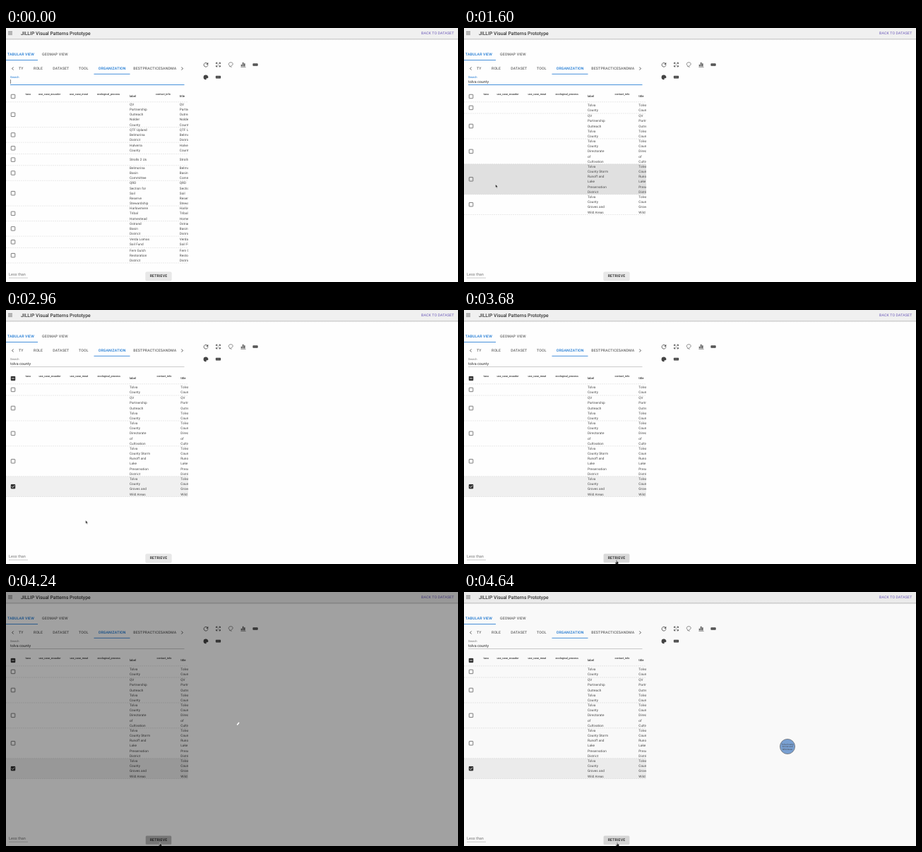
Recreate the animation shown at these times as an HTML page. Size 640x360 px, loop 4.72 s.

```html
<!DOCTYPE html>
<html lang="en">
<head>
<meta charset="utf-8">
<title>Table search</title>
<style>
  html, body { margin: 0; width: 100%; height: 100%; overflow: hidden; background: #fefefe; }
  svg { display: block; width: 100vw; height: 100vh; }
  text { font-family: Roboto, Arial, sans-serif; text-rendering: geometricPrecision; white-space: pre; }
  .tab { font-size: 5.2px; font-weight: 500; letter-spacing: .15px; fill: #666; }
  .on { fill: #1976d2; }
  .cell { font-size: 4.7px; letter-spacing: .05px; fill: #444; }
  .head { font-size: 3.75px; font-weight: 500; fill: #333; }
</style>
</head>
<body>
<svg id="stage" viewBox="0 0 640 360" xmlns="http://www.w3.org/2000/svg"></svg>
<script>
const LOOP = 4720, STEP = 80;
const TOP = 104.8, LINE = 7.17, MIN_ROW = 16.3;
const QUERY = 'tolva county';

const allRows = [
  'QV|Partnership|Outreach|Nolder|County',
  'QTF Upland|Belmorina|District',
  'Halverra|County',
  'Strolls 2 Us',
  'Belmorina|Basin|Committee',
  'QRD|Section for|Soil|Reserve|Stewardship',
  'Harlowmere|Tribal|Homestead',
  'Ostrand|Basin|District',
  'Verda Lomas|Soil Fund',
  'Fern Gulch|Restoration|District'
];
const foundRows = [
  'Tolva|County',
  'QV|Partnership|Outreach|Tolva|County',
  'Tolva|County|Directorate|of|Cultivation',
  'Tolva|County Storm|Runoff and|Lake|Preservation|District',
  'Tolva|County|Groves and|Wild Areas'
];

const text = (x, y, s, cls, extra = '') => `<text x="${x}" y="${y}" class="${cls}" ${extra}>${s}</text>`;
const rect = (x, y, w, h, fill, extra = '') =>
  `<rect x="${x}" y="${y}" width="${w}" height="${h}" fill="${fill}" ${extra}/>`;
const path = (d, extra = '') => `<path d="${d}" ${extra}/>`;
const icon = (cx, cy, body) =>
  `<g transform="translate(${cx} ${cy}) scale(.36) translate(-12 -12)" fill="#444">${body}</g>`;
const stroke = (d, w = 2) => path(d, `fill="none" stroke="#444" stroke-width="${w}"`);
const box = (cx, cy) => rect(cx - 2.75, cy - 2.75, 5.5, 5.5, 'none', 'rx=".5" stroke="#555" stroke-width=".75"');
const filledBox = (cx, cy, mark) =>
  rect(cx - 3.1, cy - 3.1, 6.2, 6.2, '#333', 'rx=".7"') +
  path(mark, `transform="translate(${cx} ${cy})" fill="none" stroke="#fff" stroke-width=".8"`);

function layout(rows) {
  let y = TOP;
  return rows.map(s => {
    const lines = s.split('|');
    const h = Math.max(MIN_ROW, lines.length * LINE);
    const row = { lines, y, h, mid: y + h / 2 };
    y += h;
    return row;
  });
}

function table(rows, id, dx) {
  const heads = [[27.5, 'taxa'], [46 + dx * .3, 'use_case_ecuador'], [90 + dx * .3, 'use_case_meat'],
    [129 + dx * .4, 'ecological_process'], [212 + dx, 'contact_info']];
  let out = heads.map(([x, s]) => text(x, 95, s, 'head')).join('');
  const titleX = 245.8 + dx;
  out += text(175, 98.3, 'label', 'head', 'style="font-size:4.2px"');
  out += text(titleX, 98.3, 'title', 'head', 'style="font-size:4.2px"');
  for (const r of rows) {
    const first = r.mid - (r.lines.length - 1) * LINE / 2 + 1.6;
    r.lines.forEach((s, i) => {
      const y = (first + i * LINE).toFixed(2);
      out += text(175, y, s, 'cell') + text(titleX, y, s, 'cell');
    });
    out += box(10, r.mid) +
      path(`M0 ${r.y + r.h}H258`, 'stroke="#d2d2d2" stroke-width=".5" stroke-dasharray="2 1"');
  }
  return `<g id="${id}" clip-path="url(#pane)">${out}</g>`;
}

const all = layout(allRows), found = layout(foundRows);
const picked = found[4];

const pill = icon(0, 0, rect(2, 7, 20, 10, '#444', 'rx="2"') +
  path('M5 12H19', 'stroke="#bbb" stroke-width="1.6" stroke-dasharray="3 2"'));
const place = (x, y, s) => `<g transform="translate(${x} ${y})">${s}</g>`;

const icons =
  icon(283, 52, stroke('M18.5 8A8 8 0 1 0 20 13', 2.2) + path('M21 3V11H13Z')) +
  icon(300.5, 52, stroke('M4 9V4H9M15 4H20V9M20 15V20H15M9 20H4V15M4 4L10 10M20 4L14 10M20 20L14 14M4 20L10 14', 2.4)) +
  icon(318.3, 52, stroke('M8 16C1 13 2 3 12 3S23 14 13 16M8 16A2 2 0 1 0 11 18C11 21 14 21 16 21', 1.7)) +
  icon(336, 52, path('M2 20H22V22H2ZM3 11H7V19H3ZM9 3H13V19H9ZM15 7H19V19H15Z')) +
  place(353, 52, pill) +
  icon(283, 69.8, path('M12 2.5A9.5 9.5 0 0 0 12 21.5C14 21.5 14 19.5 13.5 18.5C13 17 14 16 15.5 16H18C20 16 21.5 14 21.5 12C21.5 6.5 17 2.5 12 2.5Z')) +
  place(300.5, 69.6, pill);

document.getElementById('stage').innerHTML = `
  <defs>
    <clipPath id="pane"><rect y="84" width="258" height="256"/></clipPath>
    <linearGradient id="shade" x2="0" y2="1">
      <stop stop-color="#bdbdbd"/><stop offset="1" stop-color="#fefefe"/>
    </linearGradient>
  </defs>
  ${rect(0, 0, 640, 360, '#fefefe')}
  ${rect(0, 14.6, 640, 3, 'url(#shade)')}
  ${rect(0, 0, 640, 14.8, '#f0f0f0')}
  ${path('M3 5.2H9M3 7.2H9M3 9.2H9', 'stroke="#555" stroke-width=".75"')}
  ${text(21, 9.6, 'JILLIP Visual Patterns Prototype', '', 'font-size="6.8" font-weight="500" fill="#333"')}
  ${text(634.5, 9, 'BACK TO DATASET', 'tab', 'text-anchor="end" style="fill:#6a58b8;font-weight:400"')}
  ${text(2, 39, 'TABULAR VIEW', 'tab on')}
  ${text(51, 39, 'GEOMAP VIEW', 'tab')}
  ${rect(0, 45, 45, .8, '#1976d2')}
  ${path('M10.6 55.5L8.6 57.5L10.6 59.5M248.4 55.5L250.4 57.5L248.4 59.5', 'fill="none" stroke="#444" stroke-width=".9"')}
  ${[[18, 'TY'], [39, 'ROLE'], [66.3, 'DATASET'], [103, 'TOOL'], [180.3, 'BESTPRACTICESANDMA']]
    .map(([x, s]) => text(x, 59.4, s, 'tab')).join('')}
  ${text(130.7, 59.4, 'ORGANIZATION', 'tab on')}
  ${rect(124.5, 64.8, 51, .8, '#1976d2')}
  ${text(6, 70.5, 'Search', '', 'id="label" font-size="4.1"')}
  ${text(6, 78, '', '', 'id="query" font-size="5.4" fill="#333"')}
  ${rect(6.2, 73, .6, 6, '#333', 'id="caret"')}
  ${rect(6, 80.2, 246.5, .8, '#1976d2', 'id="line"')}
  ${rect(0, 0, 258, 0, '#e0e0e0', 'id="hover"')}
  ${path(`M0 ${TOP}H258`, 'stroke="#d2d2d2" stroke-width=".5" stroke-dasharray="2 1"')}
  ${box(10, 97)}
  ${table(all, 'all', 0)}
  ${table(found, 'found', 1.5)}
  <g id="ticks">
    ${filledBox(10, 97, 'M-1.8 0H1.8')}
    ${filledBox(10, picked.mid, 'M-2 0L-.6 1.4L2.1 -1.4')}
  </g>
  ${icons}
  ${text(4, 351, 'Less than', '', 'font-size="5.5" fill="#777"')}
  ${path('M4 354.2H31', 'stroke="#999" stroke-width=".5"')}
  ${rect(197.5, 346, 37, 12.2, '#000', 'rx="1.4" opacity=".12"')}
  ${rect(198, 345.5, 36, 12, '#e8e8e8', 'rx="1.3" id="button"')}
  ${text(216, 353, 'RETRIEVE', 'tab', 'text-anchor="middle" style="fill:#222"')}
  <g id="node" text-anchor="middle" font-size="3" fill="#444">
    <circle cx="458" cy="219" r="10.6" fill="#7ba3d6" stroke="#666" stroke-width=".7"/>
    ${['Tolva County', 'Groves and', 'Wild Areas'].map((s, i) => text(458, 216.6 + i * 3.6, s, '')).join('')}
  </g>
  ${rect(0, 0, 640, 360, '#000', 'id="dim"')}
  <circle id="spin" cx="320" cy="180" r="11" fill="none" stroke="#fff" stroke-width="1.6"/>
  <g id="mouse" stroke="#fff" stroke-width=".35" fill="#222">
    ${path('M0 0V4.6L1.1 3.6L1.9 5.3L2.7 4.9L1.9 3.3H3.3Z', 'id="arrow"')}
    ${path('M-.5 0Q0 -.5 .5 0V2L2.6 2.6V4.6L2 6H-.8L-2.2 3.4L-1.6 3L-.5 3.8Z', 'id="hand"')}
  </g>`;

const el = {};
document.querySelectorAll('#stage [id]').forEach(n => el[n.id] = n);
const set = (id, attrs) => { for (const k in attrs) el[id].setAttribute(k, attrs[k]); };
const show = (id, on) => { el[id].style.display = on ? '' : 'none'; };

// keys: [time, value, value...]
function track(keys, t, ease = k => k) {
  if (t <= keys[0][0]) return keys[0].slice(1);
  for (let i = 1; i < keys.length; i++) {
    const a = keys[i - 1], b = keys[i];
    if (t <= b[0]) {
      const k = ease((t - a[0]) / (b[0] - a[0]));
      return a.slice(1).map((v, j) => v + (b[j + 1] - v) * k);
    }
  }
  return keys[keys.length - 1].slice(1);
}
const smooth = k => k * k * (3 - 2 * k);

const mousePath = [[1040, 102, 122], [1120, 90, 148], [1680, 42, 226], [2240, 15.5, 250],
  [2400, 10.5, 249.5], [2640, 10.5, 249.5], [3280, 215, 347], [3440, 216, 354.5],
  [3760, 216, 354.5], [4080, 218, 355], [4480, 218, 355], [4640, 217, 355]];
const dimKeys = [[4080, 0], [4240, .37], [4320, .48], [4400, .38], [4480, .26], [4640, .02]];
const typedAt = [80, 160, 320, 400, 480, 560, 640, 800, 800, 880, 880, 1040];

function draw(t) {
  const typed = QUERY.slice(0, typedAt.filter(at => t >= at).length);
  const filtered = t >= 400, checked = t >= 2480, focused = !checked;

  el.query.textContent = typed;
  show('caret', t < 1040);
  set('caret', { x: 6.2 + (typed ? el.query.getComputedTextLength() : 0) });
  set('label', { fill: focused ? '#1976d2' : '#777' });
  set('line', { fill: focused ? '#1976d2' : '#999', height: focused ? .8 : .5 });
  show('all', !filtered);
  show('found', filtered);
  show('ticks', checked);

  const [mx, my] = track(mousePath, t, smooth);
  const over = t >= 1040 && mx < 258 && found.find(r => my >= r.y && my < r.y + r.h);
  const row = checked ? picked : over;
  show('hover', !!row);
  if (row) set('hover', { y: row.y, height: row.h, fill: over === row ? '#e0e0e0' : '#f0f0f0' });

  const onButton = my > 345, pressed = t >= 4080 && t < 4400;
  set('button', { fill: pressed ? '#bbb' : onButton ? '#d9d9d9' : '#e8e8e8' });
  show('mouse', t >= 1040);
  set('mouse', { transform: `translate(${mx} ${my})` });
  const pointing = onButton || mx < 13;
  show('hand', pointing);
  show('arrow', !pointing);

  set('dim', { opacity: track(dimKeys, t)[0] });
  show('node', t >= 4400);
  show('spin', t >= 4160 && t < 4480);
  const arc = Math.max(1, 4.5 + (t - 4240) * .06);
  set('spin', {
    'stroke-dasharray': `${arc} 80`,
    transform: `rotate(${26 + (t - 4240) * .6} 320 180)`
  });
}

const start = performance.now();
function frame() {
  const t = (performance.now() - start) % LOOP;
  draw(Math.floor(t / STEP) * STEP);
  requestAnimationFrame(frame);
}
frame();
</script>
</body>
</html>
```
